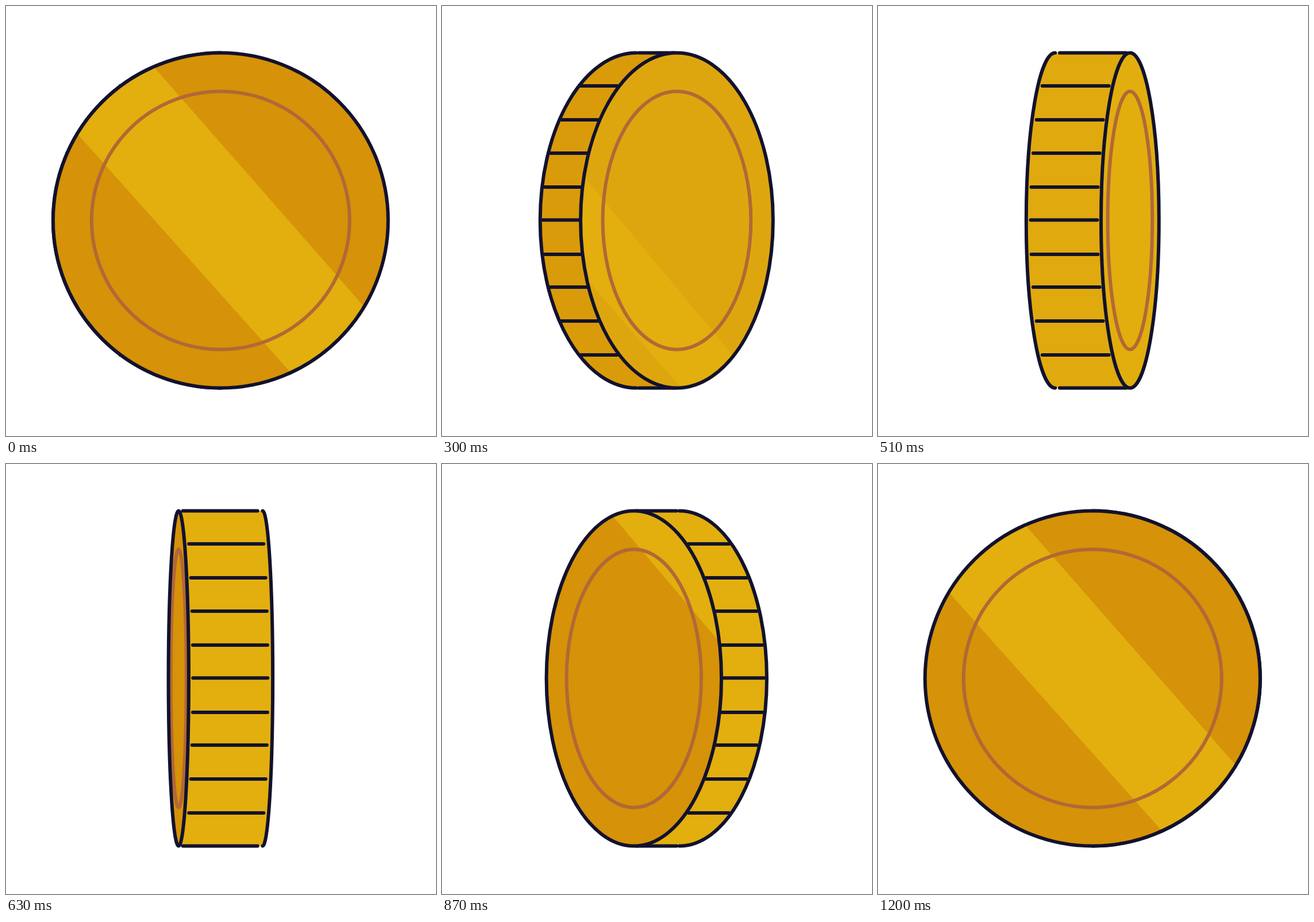
Recreate the animation shown at these times as an HTML page without scripts. Size 748x748 px, loop 1230 ms.

```html
<!DOCTYPE html>
<html lang="en">
<head>
<meta charset="utf-8">
<title>Spinning coin</title>
<style>
  @property --rx { syntax: "<number>"; inherits: true; initial-value: 291.5; }
  @property --depth { syntax: "<number>"; inherits: true; initial-value: 0; }
  @property --side { syntax: "<number>"; inherits: true; initial-value: 1; }

  html, body { margin: 0; width: 100%; height: 100%; overflow: hidden; background: #fff; }

  svg {
    --loop: 1230ms infinite;
    display: block;
    width: 100%;
    height: 100%;
    animation: spin var(--loop), deepen var(--loop), side var(--loop) step-end;
  }

  .line { fill: none; stroke: #12122e; stroke-width: 6; stroke-linecap: round; }
  .rim path { vector-effect: non-scaling-stroke; }

  .disc {
    cx: calc(var(--side) * var(--depth) * .5px);
    rx: calc(var(--rx) * 1px);
    ry: 291.5px;
  }
  .ring {
    rx: calc(var(--rx) * .77px);
    ry: 224.5px;
    fill: none;
    stroke: #b26836;
    stroke-width: 6;
  }

  .rim { transform: scaleX(var(--side)); animation: rim-tone var(--loop) linear; }
  .body {
    x: calc(var(--depth) * -.5px);
    y: -291.5px;
    width: calc(var(--depth) * 1px);
    height: 583px;
  }
  .back { transform: translateX(calc(var(--depth) * -.5px)) scale(var(--rx), 291.5); }
  /* --c is the half-width of the unit circle at the ridge's height */
  .ridge {
    transform:
      translateX(calc((var(--depth) * -.44 - var(--rx) * var(--c)) * 1px))
      scaleX(calc(var(--depth) * .89));
  }

  .face { animation: face-tone var(--loop) linear; }
  .shine { fill: #e2af0e; animation: shine var(--loop) linear; }

  @keyframes spin {
    0% { --rx: 291.5; animation-timing-function: cubic-bezier(.2, .04, .6, .54); }
    48.78% { --rx: .3; animation-timing-function: cubic-bezier(.4, .46, .8, .96); }
    97.56%, 100% { --rx: 291.5; }
  }
  @keyframes deepen {
    0% { --depth: 0; animation-timing-function: cubic-bezier(.2, .04, .6, .62); }
    48.78% { --depth: 153; animation-timing-function: cubic-bezier(.4, .33, .8, 1.03); }
    97.56%, 100% { --depth: 0; }
  }
  @keyframes side {
    0% { --side: 1; }
    48.78%, 100% { --side: -1; }
  }
  @keyframes rim-tone {
    0% { fill: #d69208; }
    24.39% { fill: #d99b0a; }
    41.46% { fill: #e0aa0e; }
    48.78%, 100% { fill: #e2af0e; }
  }
  @keyframes face-tone {
    0% { fill: #d69208; }
    24.39% { fill: #dea60e; }
    41.46% { fill: #e1ae0e; }
    48.77% { fill: #e2af0e; }
    48.78%, 100% { fill: #d69208; }
  }
  @keyframes shine {
    0% { d: path("M229 73L755 673L527 673L-9 73Z"); }
    24.39% { d: path("M61 73L561 673L424 673L-98 73Z"); }
    48.77% { d: path("M-115 73L375 673L325 673L-185 73Z"); }
    48.78% { d: path("M550 73L1030 673L1010 673L520 73Z"); }
    70.73% { d: path("M422 73L922 673L791 673L283 73Z"); }
    85.37% { d: path("M316 73L830 673L652 673L126 73Z"); }
    97.56%, 100% { d: path("M227 73L753 673L525 673L-11 73Z"); }
  }
</style>
</head>
<body>
<svg viewBox="-373.3 -373 748 748">
  <clipPath id="face"><ellipse class="disc"/></clipPath>

  <g class="rim">
    <path class="back" d="M0-1A1 1 0 0 0 0 1A1 1 0 0 0 0-1Z"/>
    <rect class="body"/>
    <path class="back line" d="M0-1A1 1 0 0 0 0 1"/>
    <path class="ridge line" style="--c:0" d="M0-291.5h1M0 291.5h1"/>
    <path class="ridge line" style="--c:.6" d="M0-234h1M0 234h1"/>
    <path class="ridge line" style="--c:.8" d="M0-175h1M0 175h1"/>
    <path class="ridge line" style="--c:.917" d="M0-117h1M0 116h1"/>
    <path class="ridge line" style="--c:.98" d="M0-58h1M0 59h1"/>
    <path class="ridge line" style="--c:1" d="M0-.8h1"/>
  </g>

  <ellipse class="disc face"/>
  <g clip-path="url(#face)">
    <path class="shine" transform="translate(-373.3 -373)" d="M229 73L755 673L527 673L-9 73Z"/>
  </g>
  <ellipse class="disc ring"/>
  <ellipse class="disc line"/>
</svg>
</body>
</html>
```
